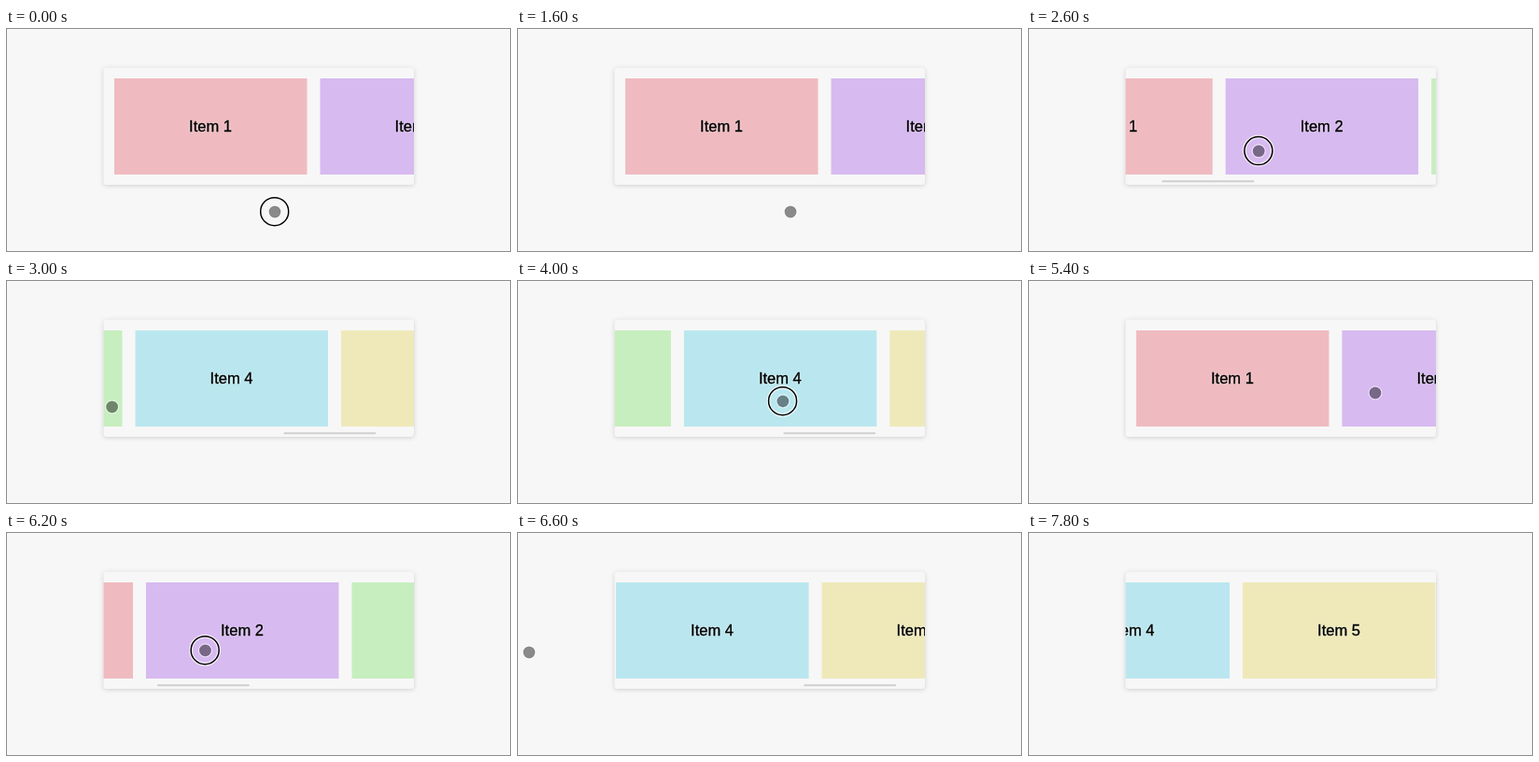
Write an HTML page that moves like this. It is 541 px wide and 240 px high and loops after 9.2 s.

```html
<!DOCTYPE html>
<html lang="en">
<head>
<meta charset="utf-8">
<title>Swipe carousel</title>
<style>
  html, body { margin: 0; width: 100%; height: 100%; overflow: hidden; background: #f7f7f7; }
  svg { display: block; width: 541px; height: 240px; }
  text {
    font: 16.5px "Liberation Sans", Arial, sans-serif;
    text-anchor: middle;
    stroke: #000;
    stroke-width: .35;
    filter: drop-shadow(0 0 .8px rgba(255, 255, 255, .6));
  }
  .panel { fill: #f7f7f7; filter: drop-shadow(0 1px 2.5px rgba(0, 0, 0, .16)); }
</style>
</head>
<body>
<svg viewBox="0 0 541 240">
  <defs>
    <clipPath id="view"><rect x="104.5" y="42.5" width="332.5" height="125.5" rx="3.5"/></clipPath>
  </defs>
  <rect width="541" height="240" fill="#f7f7f7"/>
  <rect class="panel" x="104.5" y="42.5" width="332.5" height="125.5" rx="3.5"/>
  <g clip-path="url(#view)">
    <g id="track"></g>
    <rect id="bar" y="163.3" width="99" height="2" rx="1" fill="#cfcfcf"/>
  </g>
  <g id="pointer">
    <circle r="7" fill="none" stroke="#fff" stroke-opacity=".7"/>
    <circle r="6.2" fill="#000" fill-opacity=".44" stroke="#000" stroke-opacity=".15" stroke-width=".8"/>
    <g id="ring" fill="none" transform="translate(-.3 -.3)">
      <circle r="15" stroke="#fff" stroke-opacity=".7" stroke-width="4"/>
      <circle r="15" stroke="#000" stroke-width="1.5"/>
    </g>
  </g>
  <rect x=".5" y=".5" width="540" height="239" fill="none" stroke="#8c8c8c"/>
</svg>
<script>
const LOOP = 9200, STEP = 200;
const MAX = 768, PITCH = 220.5, TAU = 145.7;
const COLORS = ['#efbbc0', '#d7baf0', '#c7eebf', '#bae7ef', '#efe9ba'];
const $ = id => document.getElementById(id);

const SWIPES = [
  { press: 2200, release: 2800, end: MAX },
  { press: 3400, release: 4100, end: 0 },
  { press: 5800, release: 6400, end: MAX }
];

// pointer stops: time, x, y
const STOPS = [
  [600, 288, 197], [1600, 293, 197],
  [2200, 372, 128], [2800, 113, 136],
  [3400, 115.5, 136], [4100, 339, 128],
  [5400, 372, 121], [5800, 400, 125], [6400, 13, 129]
];

$('track').innerHTML = COLORS.map((color, i) => {
  const x = 116 + i * PITCH;
  return `<rect x="${x}" y="54" width="206.5" height="103" fill="${color}"/>
    <text x="${x + 103}" y="111">Item ${i + 1}</text>`;
}).join('');

const clamp = v => Math.max(0, Math.min(1, v));
const smooth = u => u * u * (3 - 2 * u);
const flick = u => u ** 1.8;
const swiping = t => SWIPES.some(s => t >= s.press && t < s.release);
const pressed = t => t < STEP || (swiping(t) && !SWIPES.some(s => s.press === t && s.end === 0));

function pointerAt(t) {
  let i = STOPS.findIndex(s => s[0] > t);
  if (i < 0) i = STOPS.length - 1;
  const a = STOPS[Math.max(0, i - 1)], b = STOPS[Math.max(1, i)];
  const u = (swiping(t) ? flick : smooth)(clamp((t - a[0]) / (b[0] - a[0])));
  return [a[1] + (b[1] - a[1]) * u, a[2] + (b[2] - a[2]) * u];
}

// a swipe drags the track with the pointer, then lets it coast
function scrollAt(t) {
  const i = SWIPES.findLastIndex(s => t >= s.press);
  if (i < 0) return 0;
  const { press, release, end } = SWIPES[i];
  const base = i ? SWIPES[i - 1].end : 0;
  const dragged = base + pointerAt(press)[0] - pointerAt(Math.min(t, release))[0];
  const coast = Math.max(0, t - release);
  return coast ? end + (dragged - end) * Math.exp(-coast / TAU) : dragged;
}

function barOpacity(t) {
  const last = SWIPES.findLast(s => t > s.press);
  return last ? clamp((last.release + 1300 - t) / 200) : 0;
}

function draw(ms) {
  const t = Math.floor((ms % LOOP) / STEP) * STEP;
  const [x, y] = pointerAt(t);
  const scroll = scrollAt(t);
  $('track').setAttribute('transform', `translate(${-scroll})`);
  $('bar').setAttribute('x', 106 + scroll * .2995);
  $('bar').setAttribute('opacity', barOpacity(t));
  $('pointer').setAttribute('transform', `translate(${x} ${y})`);
  $('pointer').setAttribute('opacity', t > 6600 ? 0 : 1);
  $('ring').setAttribute('opacity', pressed(t) ? 1 : 0);
}

const start = performance.now();
function tick() {
  draw(performance.now() - start);
  requestAnimationFrame(tick);
}
tick();
</script>
</body>
</html>
```
